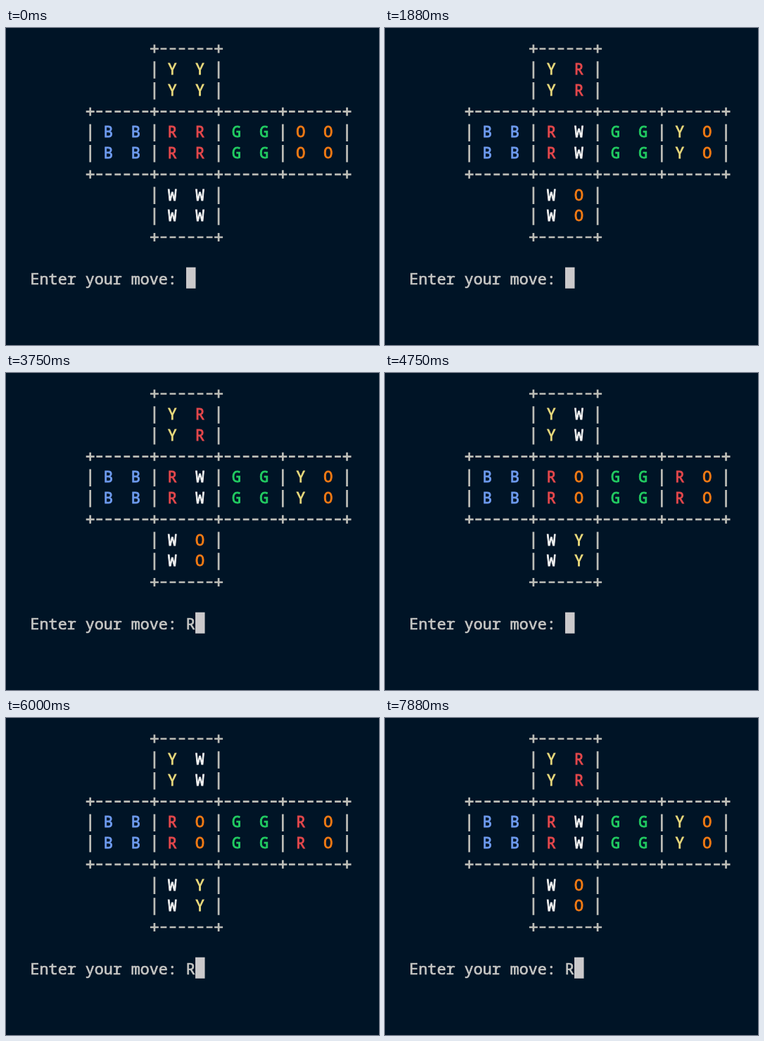
These frames come from a looping animation (530x450 px, 8000 ms). An HTML page:

```html
<!DOCTYPE html>
<html lang="en">
<head>
<meta charset="utf-8">
<title>Cube in the terminal</title>
<style>
  html, body { margin: 0; width: 100%; height: 100%; overflow: hidden; background: #001426; }
  svg { display: block; width: 530px; height: 450px; }
  text {
    font: 500 21.7px "Noto Sans Mono", "DejaVu Sans Mono", monospace;
    fill: currentColor; stroke: currentColor; stroke-width: 0.7; color: #c6c6c4; white-space: pre;
  }
  .tile { text-anchor: middle; stroke-width: 0.9; }
  #frame { fill: none; stroke: #bdbdb7; stroke-width: 2.7; }
  #cursor { fill: #cbc9cb; }
</style>
</head>
<body>
<svg viewBox="0 0 530 450">
  <path id="frame"/>
  <g id="tiles"></g>
  <text id="prompt" x="34.6" y="363.8"></text>
  <rect id="cursor" width="13.5" height="30"/>
</svg>
<script>
const LOOP = 8000, LEFT = 35, CELL = 13.03, LINE = 29.72, PROMPT_ROW = 11;
const PROMPT = "Enter your move: ";
const COLORS = { Y: "#e8d97c", B: "#6f9cf0", R: "#e5484c", G: "#22cc62", O: "#f57c14", W: "#f1f1f1" };
const RING = "YRWO";

// Lower-case u, f, d and b mark the column that a right turn moves.
const NET = [
  "       +------+",
  "       | Y  u |",
  "       | Y  u |",
  "+------+------+------+------+",
  "| B  B | R  f | G  G | b  O |",
  "| B  B | R  f | G  G | b  O |",
  "+------+------+------+------+",
  "       | W  d |",
  "       | W  d |",
  "       +------+",
].map(row => " ".repeat(6) + row);

// [time, quarter turns, typed text, cursor on the next line]
const STEPS = [
  [0, 0, ""],
  [750, 0, "r"], [880, 0, "ri"], [1000, 0, "rig"], [1130, 0, "righ"], [1250, 0, "right"],
  [1750, 1, ""], [3130, 1, "R"],
  [4380, 2, ""], [5630, 2, "R"], [6130, 2, "R'"], [6750, 2, "R'", true],
  [6880, 1, ""], [7750, 1, "R"],
];

const byId = id => document.getElementById(id);
const centerX = col => LEFT + CELL * (col + 0.5);
const centerY = row => 29.5 + LINE * row;

const strokes = {
  "-": (x, y) => `M${x - 4.4} ${y}h8.8`,
  "+": (x, y) => `M${x - 6} ${y}h12M${x} ${y - 6}v12`,
  "|": (x, y) => `M${x} ${y - 12}v24.5`,
};

const moving = [];
let outline = "";

function paint(tile, letter) {
  tile.textContent = letter;
  tile.style.color = COLORS[letter];
}

function addTile(char, x, y) {
  const tile = document.createElementNS("http://www.w3.org/2000/svg", "text");
  tile.setAttribute("class", "tile");
  tile.setAttribute("x", x - 0.6);
  tile.setAttribute("y", y + 7.1);
  byId("tiles").append(tile);
  const slot = "ufdb".indexOf(char);
  if (slot < 0) paint(tile, char);
  else moving.push({ tile, slot });
}

NET.forEach((line, row) => [...line].forEach((char, col) => {
  const x = centerX(col), y = centerY(row);
  if (strokes[char]) outline += strokes[char](x, y);
  else if (char !== " ") addTile(char, x, y);
}));
byId("frame").setAttribute("d", outline);

let shown;
function show(step) {
  if (step === shown) return;
  shown = step;
  const [, turns, typed, nextLine] = step;
  for (const { tile, slot } of moving) paint(tile, RING[(slot + turns) % 4]);
  byId("prompt").textContent = PROMPT + typed;
  const col = nextLine ? 0 : PROMPT.length + typed.length;
  byId("cursor").setAttribute("x", LEFT + CELL * col - 0.5);
  byId("cursor").setAttribute("y", centerY(PROMPT_ROW + (nextLine ? 1 : 0)) - 16.7);
}

const start = performance.now();
function tick() {
  const time = (performance.now() - start) % LOOP;
  show(STEPS.findLast(([at]) => at <= time));
  requestAnimationFrame(tick);
}
tick();
</script>
</body>
</html>
```
